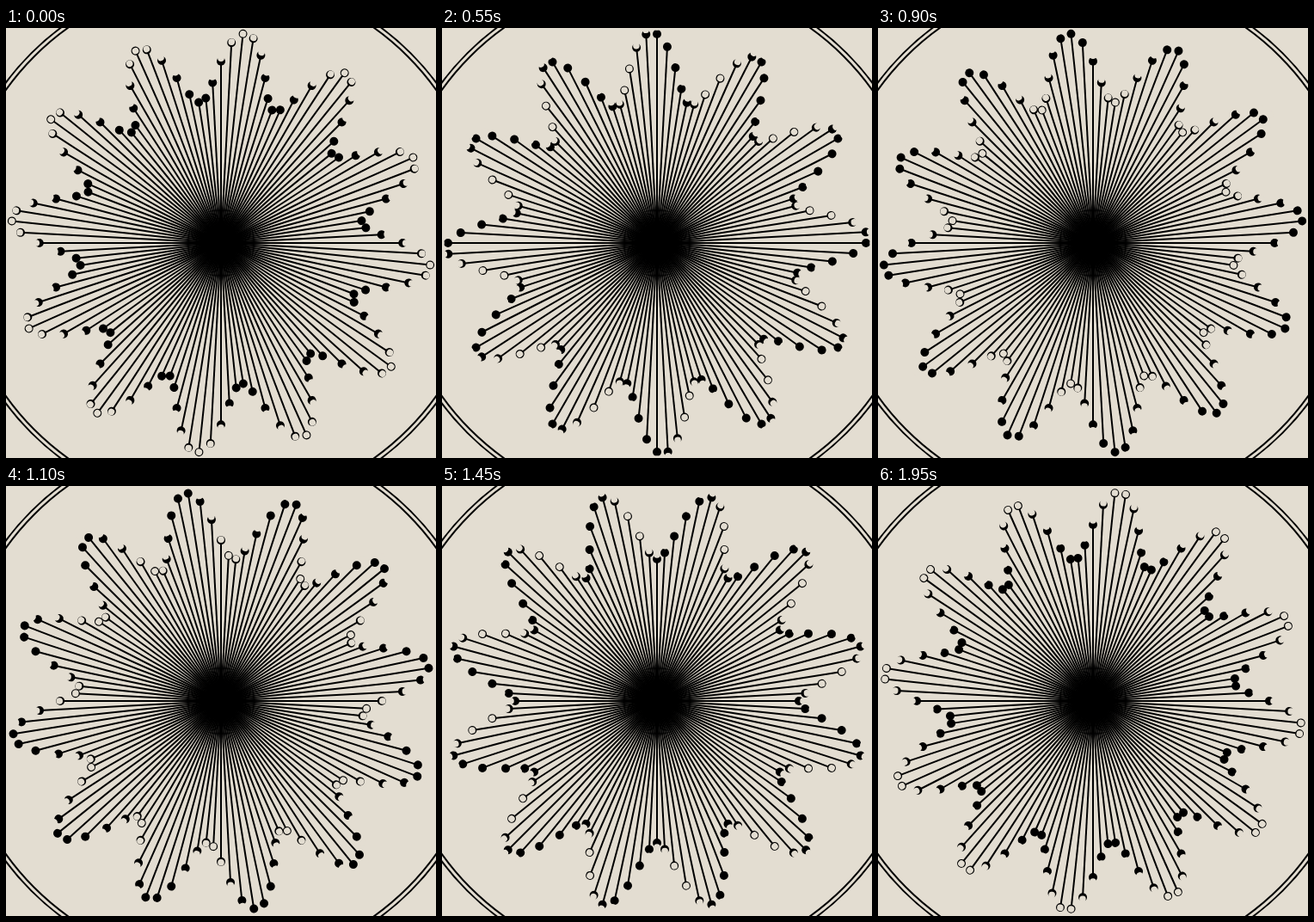
An HTML page with a canvas for the animation above (2 s loop, 500 px wide and 500 px high).

```html
<!DOCTYPE html>
<html lang="en">
<head>
<meta charset="utf-8">
<title>Moon burst</title>
<style>
  html, body { margin: 0; width: 100%; height: 100%; overflow: hidden; background: #e3ddd1; }
  canvas { display: block; }
</style>
</head>
<body>
<canvas id="stage" width="500" height="500"></canvas>
<script>
const ctx = document.getElementById('stage').getContext('2d');
const PAPER = '#e3ddd1', INK = '#000';
const RAYS = 120, WAVES = 12, TAU = Math.PI * 2;
const LOOP = 2000, STEP = 50, STEPS = LOOP / STEP;

function disc(y, r, color) {
  ctx.fillStyle = color;
  ctx.beginPath();
  ctx.arc(0, y, r, 0, TAU);
  ctx.fill();
}

function ring(r) {
  ctx.beginPath();
  ctx.arc(0, 0, r, 0, TAU);
  ctx.stroke();
}

// A ray pointing up, tipped with a moon whose shadow slides outward.
function ray(length, slide) {
  ctx.beginPath();
  ctx.moveTo(0, 0);
  ctx.lineTo(0, -length);
  ctx.stroke();
  disc(-length, 5, INK);
  disc(-length - slide, 3.8, PAPER);
}

function draw(phase) {
  ctx.setTransform(1, 0, 0, 1, 250, 250);
  ctx.fillStyle = PAPER;
  ctx.fillRect(-250, -250, 500, 500);
  ctx.strokeStyle = INK;
  ctx.lineWidth = 2;
  ring(307);
  ring(312);
  for (let i = 0; i < RAYS; i++) {
    const wave = i / RAYS * WAVES * TAU;
    ray(205 + 40 * Math.sin(wave + phase), 5 * (1 - Math.sin(wave + 2 * phase)));
    ctx.rotate(TAU / RAYS);
  }
}

const start = performance.now();
function tick() {
  const step = Math.floor((performance.now() - start) % LOOP / STEP);
  draw((step + 1) / STEPS * TAU);
  requestAnimationFrame(tick);
}
tick();
</script>
</body>
</html>
```
